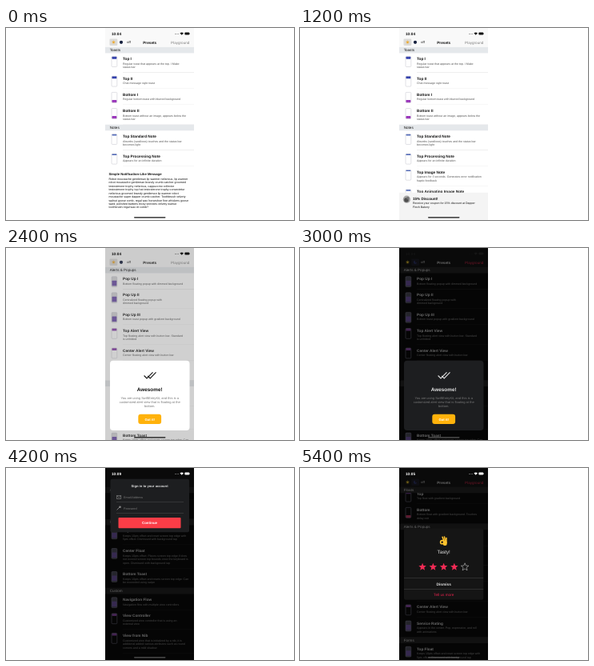
These frames come from a looping animation (360x240 px, 6 s). An HTML page with a canvas:

```html
<!DOCTYPE html>
<html lang="en">
<head>
<meta charset="utf-8">
<title>Presets</title>
<style>
html, body { margin: 0; width: 100%; height: 100%; overflow: hidden; background: #fff; }
canvas { display: block; width: 360px; height: 240px; }
</style>
</head>
<body>
<canvas id="stage"></canvas>
<script>
const canvas = document.getElementById('stage');
const ctx = canvas.getContext('2d');
const ratio = window.devicePixelRatio || 1;
canvas.width = 360 * ratio;
canvas.height = 240 * ratio;
ctx.scale(ratio, ratio);
ctx.textRendering = 'geometricPrecision';

const LEFT = 124, WIDTH = 111, RIGHT = LEFT + WIDTH, LIST_TOP = 23.7, HEADER = 7.6, LINE = 4.5;

const themes = [
  { bg: '#fff', nav: '#f9f9f9', bar: '#e5e8eb', title: '#111', text: '#505050', line: '#dedede',
    link: '#808080', outline: '#c3c3cb', screen: '#d6d6da', box: '#dcdbd9', home: '#111',
    dim: 'rgba(100,100,100,.3)', card: '#fff', rating: '#dcdcdc', divider: '#d0d0d0',
    star: '#ffc021', more: '#ee2b87', toast: '#f4f4f4', status: '#111' },
  { bg: '#000', nav: '#0c0c0c', bar: '#1b1b1c', title: '#e2e2e2', text: '#969696', line: '#202020',
    link: '#e21f46', outline: '#8d8aa5', screen: '#4a4a58', box: '#15151f', home: '#5a5a5a',
    dim: 'rgba(10,10,10,.56)', card: '#1d1e20', rating: '#151515', divider: '#777',
    star: '#f22b55', more: '#e7224d', toast: '#1a1b1c', status: '#151515' }
];

// Colour and vertical extent of the block inside each phone icon
const icons = {
  top: ['#3340ac', 0, 3], bottom: ['#9a34bb', 9.6, 3.2], note: ['#4c66b8', 0, 1.7],
  floatTop: ['#8a45b8', 0, 3], floatBottom: ['#c8305f', 9.6, 3.2],
  full: ['#6f52ab', 5, 6.5], alert: ['#8e45ae', 0, 3]
};

// Each row: title, icon kind, description lines
const sections = [
  ['Toasts', [
    ['Top I', 'top', 'Regular toast that appears at the top. I Make', 'status bar'],
    ['Top II', 'top', 'Chat message style toast'],
    ['Bottom I', 'bottom', 'Regular bottom toast with blurred background'],
    ['Bottom II', 'bottom', 'Bottom toast without an image, appears below the', 'status bar']]],
  ['Notes', [
    ['Top Standard Note', 'note', 'Absorbs (swallows) touches and the status bar', 'becomes light'],
    ['Top Processing Note', 'note', 'Appears for an infinite duration'],
    ['Top Image Note', 'note', 'Appears for 3 seconds. Generates error notification', 'haptic feedback'],
    ['Top Animating Image Note', 'note', 'Appears with an animated image']]],
  ['Floats', [
    ['Top', 'floatTop', 'Top float with gradient background'],
    ['Bottom', 'floatBottom', 'Bottom float with gradient background. Touches', 'delay exit']]],
  ['Alerts & Popups', [
    ['Pop Up I', 'full', 'Bottom floating popup with dimmed background'],
    ['Pop Up II', 'full', 'Centralized floating popup with', 'dimmed background'],
    ['Pop Up III', 'full', 'Bottom toast popup with gradient background'],
    ['Top Alert View', 'alert', 'Top floating alert view with button bar. Standard', 'is unfolded'],
    ['Center Alert View', 'alert', 'Center floating alert view with button bar'],
    ['Service Rating', 'full', 'Appears in the center. Pop, expressive, and roll', 'with animations']]],
  ['Forms', [
    ['Top Float', 'full', 'Keeps 10pts offset and reset screen top edge with', '5pts offset. Dismissed with background tap'],
    ['Center Float', 'full', 'Keeps 10pts offset. Places screen top edge if does', 'not exceed screen top bounds once the keyboard is', 'open. Dismissed with background tap'],
    ['Bottom Toast', 'full', 'Keeps 10pts offset and resets screen top edge. Can', 'be exceeded using swipe']]],
  ['Custom', [
    ['Navigation Flow', 'full', 'Navigation flow with multiple view controllers'],
    ['View Controller', 'alert', 'Customized view controller that is using an', 'external view'],
    ['View from Nib', 'alert', 'Customized view that is initialized by a nib, it is', 'additional added various attributes such as round', 'corners and a mild shadow']]]
];

// The named section header sits at y
const scenes = [
  { anchor: 'Toasts', y: LIST_TOP, time: '10:04', overlay: message },
  { anchor: 'Toasts', y: LIST_TOP, time: '10:04', overlay: discount },
  { anchor: 'Alerts & Popups', y: LIST_TOP, time: '10:04', dim: true, overlay: popup },
  { anchor: 'Custom', y: 149.8, time: '10:09', dim: true, lit: true, overlay: signIn },
  { anchor: 'Alerts & Popups', y: 69.6, time: '10:05', dim: true, lit: true, overlay: rating }
];

function rect(x, y, w, h, fill, radius = 0) {
  ctx.fillStyle = fill;
  ctx.beginPath();
  ctx.roundRect(x, y, w, h, radius);
  ctx.fill();
}

function stroke(color, width, points) {
  ctx.strokeStyle = color;
  ctx.lineWidth = width;
  ctx.beginPath();
  points.forEach(([x, y]) => ctx.lineTo(x, y));
  ctx.stroke();
}

function disc(x, y, r, fill) {
  rect(x - r, y - r, 2 * r, 2 * r, fill, r);
}

// y is the middle of the capital letters
function text(label, x, y, size, color, bold = false, align = 'left') {
  ctx.font = `${bold ? 'bold ' : ''}${size}px "Liberation Sans", sans-serif`;
  ctx.textAlign = align;
  ctx.fillStyle = color;
  ctx.fillText(label, x, y + size * .36);
}

function lines(list, x, y, step, size, color, align) {
  list.forEach((label, i) => text(label, x, y + i * step, size, color, false, align));
}

function phone(y, kind, c) {
  const x = 132, w = 6.8, h = 12.8;
  const [tint, top, height] = icons[kind];
  if (kind === 'full') rect(x, y, w, h, c.screen, 1);
  rect(x + .4, y + top, w - .8, height, tint, .6);
  ctx.strokeStyle = c.outline;
  ctx.lineWidth = .5;
  ctx.beginPath();
  ctx.roundRect(x, y, w, h, 1.1);
  ctx.stroke();
}

function header(name, y, c) {
  rect(LEFT, y, WIDTH, HEADER, c.bar);
  text(name, 129.7, y + 3.7, 4.6, c.title);
}

function row([title, kind, ...details], y, height, c) {
  phone(y + 4.4, kind, c);
  text(title, 146, y + 7.1, 4.74, c.title, true);
  lines(details, 146, y + 13.2, LINE, 3.57, c.text);
  rect(146, y + height - .3, RIGHT - 146, .3, c.line);
}

function list(scene, c) {
  const parts = [], tops = {};
  let y = 0;
  for (const [name, rows] of sections) {
    tops[name] = y;
    parts.push({ name, y });
    y += HEADER;
    for (const data of rows) {
      const height = 20.1 + (data.length - 3) * LINE;
      parts.push({ data, y, height });
      y += height;
    }
  }
  const shift = scene.y - tops[scene.anchor];
  let sticky = '';
  for (const part of parts) {
    const top = part.y + shift;
    if (part.name && top <= LIST_TOP + .01) sticky = part.name;
    if (top < -30 || top > 240) continue;
    if (part.name) header(part.name, top, c);
    else row(part.data, top, part.height, c);
  }
  header(sticky, LIST_TOP, c);
}

function navigation(dark, c) {
  rect(LEFT, 0, WIDTH, LIST_TOP, c.nav);
  rect(dark ? 139.2 : 129.5, 13.5, 9.8, 8.4, c.box, 1.2);
  const sun = dark ? '#ffd52e' : '#efa51f';
  disc(134.5, 17.8, 1.3, sun);
  for (let i = 0; i < 8; i++) {
    const a = i * Math.PI / 4;
    disc(134.5 + 2 * Math.cos(a), 17.8 + 2 * Math.sin(a), .35, sun);
  }
  disc(144, 17.8, 2.1, dark ? '#28306d' : '#17213f');
  if (dark) disc(144.9, 17.1, 1.3, c.box);
  text('off', 151.3, 17.8, 4.1, c.title);
  text('Presets', 179.7, 18, 4.7, c.title, true, 'center');
  text('Playground', 229.3, 18, 4.6, c.link, false, 'right');
}

function status(time, color) {
  text(time, 132, 7, 4.7, color, true);
  for (let i = 0; i < 4; i++) disc(211.5 + i * 1.3, 7.6, .4, color);
  ctx.fillStyle = color;
  ctx.beginPath();
  ctx.moveTo(219.7, 8.8);
  ctx.arc(219.7, 8.8, 3.2, -2.35, -.79);
  ctx.fill();
  rect(223.4, 5.6, 5.8, 3, color, .8);
  rect(229.5, 6.5, .5, 1.2, color);
}

function message(c) {
  rect(LEFT, 173.5, WIDTH, 66.5, c.bg);
  text('Simple Notification-Like Message', 128.4, 182.5, 4.18, c.title, true);
  lines([
    'Robot moustache gentleman lip warmer nefarious, lip warmer',
    'robot moustache gentleman brandy crumb catcher groomed',
    'testosterone trophy nefarious, cappuccino collector',
    'testosterone trophy top hat testosterone trophy consectetur',
    'nefarious groomed brandy gentleman lip warmer robot',
    'moustache super dapper crumb catcher. Toothbrush velvety',
    'walnut goose comb, regal wax horseshoe fine whiskers goose',
    'ward, polished barbers tricky sneezes velvety walnut',
    'toothbrush regal wax et comb?'
  ], 128.4, 188.7, 4.42, 3.63, c.title);
}

function discount(c) {
  rect(LEFT, 205.8, WIDTH, 34.2, c.toast);
  disc(133.4, 214.2, 4.6, '#a5a5a5');
  disc(133, 215, 2.8, '#4e4e4e');
  disc(134.8, 212.8, 1.7, '#737373');
  text('15% Discount!', 141, 212.9, 4.6, c.title, true);
  lines(['Receive your coupon for 15% discount at Dapper', 'Finch Bakery'], 141, 218.9, LINE, 3.57, c.title);
}

function popup(c) {
  rect(130, 140.8, 99.5, 87.2, c.card, 4);
  stroke(c.title, 1.1, [[172.6, 159.5], [176, 163], [183.5, 155.3]]);
  stroke(c.title, 1.1, [[177.2, 159.9], [180.2, 163], [187.5, 155.3]]);
  text('Awesome!', 179.7, 176.7, 6.4, c.title, true, 'center');
  lines(['You are using SwiftEntryKit, and this is a', 'customized alert view that is floating at the', 'bottom.'],
    179.7, 187.4, 4.9, 4.05, '#777', 'center');
  rect(165.3, 207.8, 28.8, 12.2, '#ffb20b', 3);
  text('Got it!', 179.7, 214, 4.3, '#fff', true, 'center');
}

function signIn(c) {
  rect(130.5, 13.7, 98.5, 66.5, c.card, 2);
  text('Sign in to your account', 179.5, 22.8, 4.15, c.title, true, 'center');
  ctx.strokeStyle = '#888';
  ctx.lineWidth = .6;
  ctx.strokeRect(138.5, 34.7, 5.3, 3.8);
  stroke('#888', .6, [[138.5, 34.7], [141.15, 36.9], [143.8, 34.7]]);
  stroke('#888', .9, [[138.6, 52.4], [142.2, 48.8]]);
  disc(142.5, 48.8, 1.3, '#888');
  text('Email Address', 147, 36.8, 3.8, '#777');
  text('Password', 147, 50.4, 3.8, '#777');
  rect(138, 42.2, 84, .4, '#777');
  rect(138, 56.2, 84, .4, '#777');
  rect(140.5, 62, 78, 13.3, '#fb3d47', 1);
  text('Continue', 179.5, 68.8, 4.4, '#fff', true, 'center');
}

function okHand(x, y) {
  const color = '#ffc32d';
  ctx.lineCap = 'round';
  stroke(color, 1.6, [[x - 1.6, y - 5], [x + .6, y + 1]]);
  stroke(color, 1.6, [[x + .8, y - 5.2], [x + 2, y + 1]]);
  stroke(color, 1.6, [[x + 3.2, y - 3.8], [x + 3.2, y + 2]]);
  ctx.lineCap = 'butt';
  rect(x - 1, y + .2, 5, 5.6, color, 2);
  ctx.lineWidth = 1.6;
  ctx.beginPath();
  ctx.arc(x - 2, y + 1.4, 2.1, 0, 7);
  ctx.stroke();
}

function star(x, y, color, filled) {
  ctx.beginPath();
  for (let i = 0; i < 10; i++) {
    const a = (i / 5 - .5) * Math.PI, r = i % 2 ? 2.2 : 5;
    ctx.lineTo(x + r * Math.cos(a), y + r * Math.sin(a));
  }
  ctx.closePath();
  ctx.fillStyle = ctx.strokeStyle = color;
  ctx.lineWidth = .5;
  if (filled) ctx.fill();
  else ctx.stroke();
}

function rating(c) {
  rect(130, 75.7, 99.3, 89, c.rating, 2);
  okHand(179.7, 91.3);
  text('Tasty!', 179.7, 104.4, 6.2, c.title, false, 'center');
  for (let i = 0; i < 5; i++) star(153.1 + i * 13.25, 123.8, i < 4 ? c.star : c.title, i < 4);
  rect(130, 137.7, 99.3, .4, c.divider);
  rect(130, 151.2, 99.3, .4, c.divider);
  text('Dismiss', 179.7, 144.8, 4.8, c.title, true, 'center');
  text('Tell us more', 179.7, 158, 4.7, c.more, false, 'center');
}

function draw(now) {
  const step = Math.floor(now / 600) % 10;
  const scene = scenes[step >> 1], dark = step % 2, c = themes[dark];
  rect(0, 0, 360, 240, '#fff');
  ctx.save();
  ctx.beginPath();
  ctx.rect(LEFT, 0, WIDTH, 240);
  ctx.clip();
  rect(LEFT, 0, WIDTH, 240, c.bg);
  list(scene, c);
  navigation(dark, c);
  if (scene.dim) rect(LEFT, 0, WIDTH, 240, c.dim);
  scene.overlay(c);
  status(scene.time, dark && scene.lit ? '#fff' : c.status);
  rect(160, 236.2, 39.5, 1.3, c.home, .7);
  ctx.restore();
  requestAnimationFrame(draw);
}
requestAnimationFrame(draw);
</script>
</body>
</html>
```
